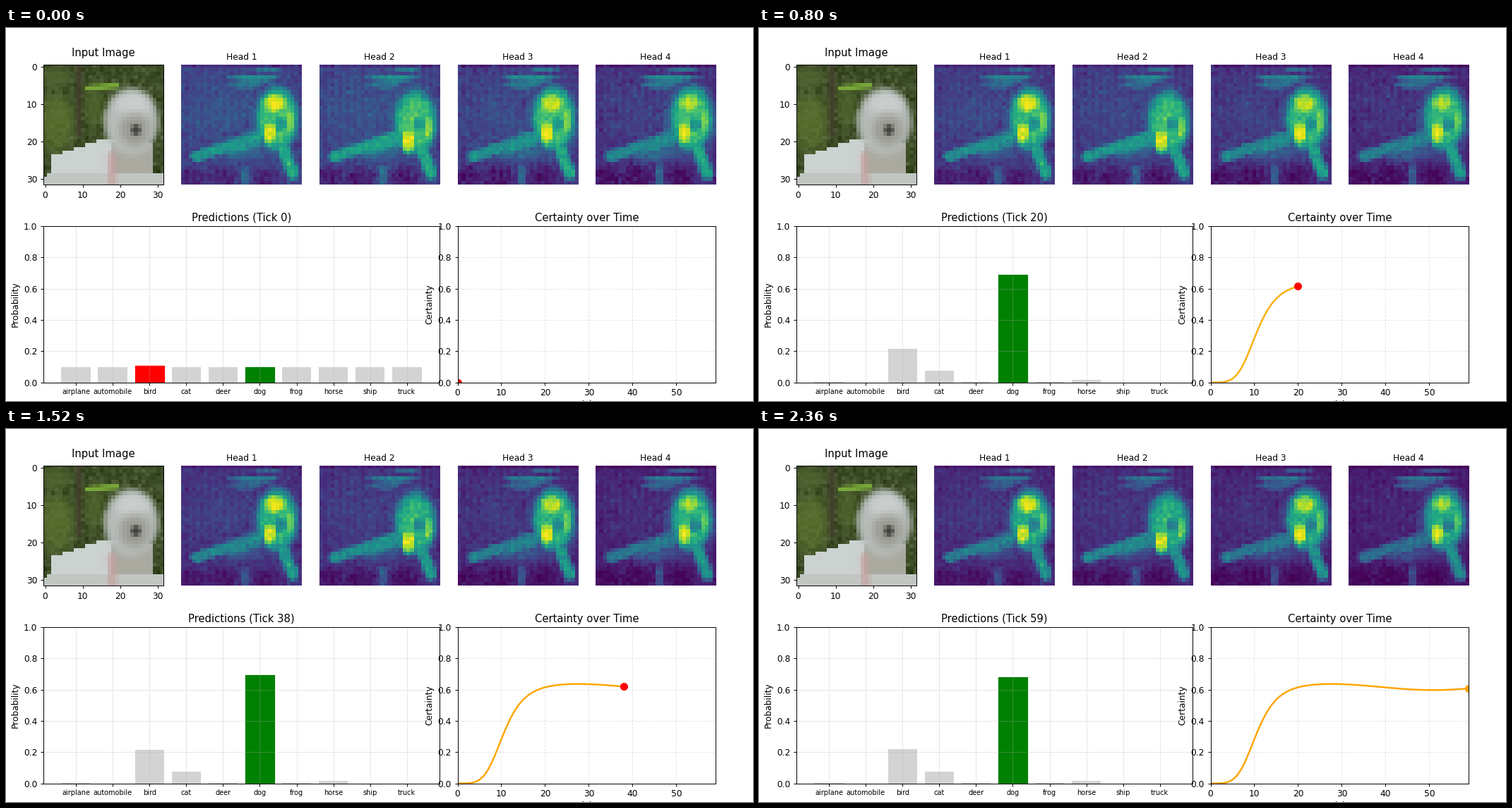
These frames come from a looping animation (1058x529 px, 2400 ms). A matplotlib script:

```python
import numpy as np
import matplotlib.pyplot as plt
from matplotlib.animation import FuncAnimation

TICKS = 60
plt.rcParams["font.family"] = "DejaVu Sans"
Y, X = np.mgrid[0:32, 0:32].astype(float)


def blob(cx, cy, rx, ry, p=2):
    """Soft ellipse, 1 at its centre."""
    return np.exp(-(((X - cx) / rx) ** 2 + ((Y - cy) / ry) ** 2) ** p)


def ridge(x0, y0, x1, y1, w):
    """Soft line segment."""
    dx, dy = x1 - x0, y1 - y0
    u = np.clip(((X - x0) * dx + (Y - y0) * dy) / (dx * dx + dy * dy), 0, 1)
    d = np.hypot(X - x0 - u * dx, Y - y0 - u * dy)
    return np.exp(-(d / w) ** 4)


def picture():
    """Pale animal on dark greenery, in soft tones."""
    rng = np.random.default_rng(5)
    img = np.full((32, 32, 3), (62, 78, 40), float)
    img += rng.normal(0, 9, (32, 32, 1))

    def paint(alpha, *rgb):
        a = np.clip(alpha, 0, 1)[..., None]
        img[:] = img * (1 - a) + a * np.array(rgb)

    paint(0.7 * blob(3, 15, 5, 8), 98, 122, 50)
    paint(0.6 * blob(13, 11, 3, 6), 84, 108, 46)
    paint(0.6 * blob(3, 3, 4, 3), 88, 110, 52)
    paint(0.8 * ridge(9, -2, 9, 18, 0.9), 70, 60, 46)
    paint(0.9 * ridge(11, 6, 19, 5.2, 0.8), 128, 178, 58)

    back = 24 - 4 * np.clip((X - 2) / 12, 0, 1) ** 0.8
    paint((Y >= back) & (X >= 1.5) & (X < 20), 204, 210, 208)
    paint((X > 17) & (X < 29) & (Y > 20), 170, 170, 161)
    paint(Y >= 29 + (X < 1), 194, 198, 195)
    paint(0.7 * ridge(17.5, 24, 17.8, 31, 1.3), 196, 162, 160)
    paint(blob(22.8, 14.9, 7.4, 9, 6), 184, 189, 186)
    paint(0.7 * blob(23.2, 10, 5, 3.5), 208, 214, 213)
    paint(0.8 * blob(23.7, 17, 4.2, 4.5), 148, 147, 138)
    paint(0.9 * blob(24, 17, 1.3, 1.4), 56, 54, 52)
    return np.clip(img, 0, 255) / 255


def attention(n, bg, top, drop, body, dark):
    """Heat map of one head; drop moves the lower hot spot down."""
    rng = np.random.default_rng(n)
    v = bg + 0.06 * blob(11, 12, 11, 9, 1) - 0.08 * (Y < 1)
    layers = [
        (0.5, blob(19, 3.3, 8.5, 1.1)), (0.39, blob(16.5, 5, 6, 1.6)),
        (0.38, blob(22.5, 1.2, 5, 0.8)), (0.33, blob(15, 22.5, 10, 3.5)),
        (0.43, blob(24.6, 14.5, 8, 11)),
        (body, ridge(3.5, 24, 20, 18.8, 1.9)),
        (body, ridge(13, 21.5, 20, 19, 2.7)),
        (0.6, ridge(26, 20, 29, 28.5, 2)), (0.35, blob(16.6, 29, 1.4, 4)),
        (0.7, blob(24.9, 14 + drop / 2, 6.2, 9.4, 3)),
        (top, blob(24.4, 10, 4.3, 3.4)),
        (0.96, blob(23, 17.8 + drop, 2.4, 4)),
        (0.8, blob(28.3, 14.5 + drop, 1.8, 5)),
    ]
    for amp, shape in layers:
        v = np.maximum(v, amp * shape)
    v -= 0.2 * blob(25.9, 15.5, 1.6, 1.8)
    for cx in (2, 10.5, 22):
        v *= 1 - dark * blob(cx, 29.5, 4.2, 2.8)
    v += rng.normal(0, 0.028, v.shape) + 0.012 * (-1) ** X
    v = np.clip(v, 0.01, None)
    return v / v.max()


HEADS = [attention(1, 0.2, 0.96, 0, 0.53, 0.45),
         attention(2, 0.2, 0.66, 2, 0.56, 0.6),
         attention(3, 0.17, 0.9, 0, 0.5, 0.7),
         attention(4, 0.14, 0.88, 0, 0.47, 0.7)]

NAMES = ["airplane", "automobile", "bird", "cat", "deer",
         "dog", "frog", "horse", "ship", "truck"]
SCORES = np.array([-3.7, -5.4, -.68, -1.3, -3.2, 0, -3.7, -2.16, -5.2, -5])
BIRD, TRUE = NAMES.index("bird"), NAMES.index("dog")

t = np.arange(TICKS)
certainty = (.657 / (1 + (10.67 / np.maximum(t, .01)) ** 4.4)
             - .059 * np.exp(-((t - 51) / 18) ** 2))
certainty = np.maximum(certainty, 0)


def softmax(z):
    e = np.exp(z)
    return e / e.sum(axis=1, keepdims=True)


# Certainty is 1 - normalised entropy; find the sharpness that yields it.
sharp = np.linspace(0, 3, 400)
p = softmax(np.outer(sharp, SCORES))
known = 1 + (p * np.log(p)).sum(axis=1) / np.log(10)
logits = np.outer(np.interp(certainty, known, sharp), SCORES)
logits[:, BIRD] += .06 * np.exp(-t / 2)
probs = softmax(logits)

YELLOW, ORANGE = np.array([.91, .86, .2]), np.array([1, .647, 0])

fig = plt.figure(figsize=(12, 6), dpi=1058 / 12, facecolor="white")
gs = fig.add_gridspec(2, 5, left=.05, right=.95, top=.95, bottom=.05,
                      wspace=.15, hspace=.15)

ax = fig.add_subplot(gs[0, 0])
ax.imshow(picture())
ax.set_title("Input Image", pad=10)

maps = []
for i, head in enumerate(HEADS):
    ax = fig.add_subplot(gs[0, i + 1])
    maps.append(ax.imshow(head, cmap="viridis", vmin=0, vmax=1))
    ax.set_title(f"Head {i + 1}", fontsize=10)
    ax.axis("off")

pred = fig.add_subplot(gs[1, :3])
bars = pred.bar(range(10), probs[0], color="lightgray")
pred.set_xticks(range(10), NAMES, fontsize=8)
pred.set_ylim(0, 1)
pred.set_ylabel("Probability")
pred.grid(True, alpha=.3)

cert = fig.add_subplot(gs[1, 3:])
line, = cert.plot([], [], lw=2)
dot, = cert.plot([], [], "o", ms=8)
cert.set_xlim(0, TICKS - 1)
cert.set_ylim(0, 1)
cert.set_title("Certainty over Time")
cert.set_xlabel("tick", labelpad=3)
cert.set_ylabel("Certainty")
cert.grid(True, linestyle="--", alpha=.3)


def update(k):
    for im, head in zip(maps, HEADS):
        im.set_data(head ** (1 + .35 * k / (TICKS - 1)))

    best = probs[k].argmax()
    for i, bar in enumerate(bars):
        bar.set_height(probs[k, i])
        color = "green" if i == TRUE else "red" if i == best else "lightgray"
        bar.set_facecolor(color)
        bar.set_edgecolor(color)
        bar.set_linewidth(0 if color == "lightgray" else 1)
    pred.set_title(f"Predictions (Tick {k})")

    mix = np.clip((k - 12) / 10, 0, 1)
    line.set_data(t[:k + 1], certainty[:k + 1])
    line.set_color(YELLOW + mix * (ORANGE - YELLOW))
    dot.set_data([k], [certainty[k]])
    dot.set_color("red" if k < 43 else "orange")
    return [*maps, *bars, line, dot]


anim = FuncAnimation(fig, update, frames=TICKS, interval=40, repeat=True,
                     repeat_delay=0, blit=False)
plt.show()
```
